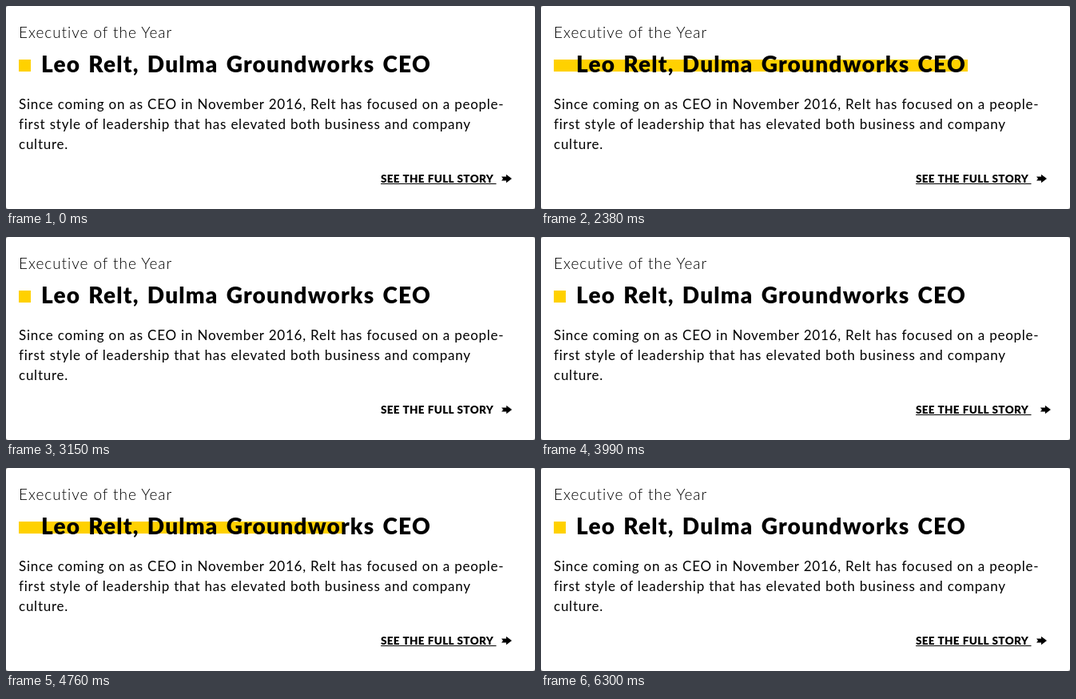
Animation, 662 px wide and 254 px high, one loop 6930 ms. Source, as an HTML page:

```html
<!DOCTYPE html>
<html lang="en">
<head>
<meta charset="utf-8">
<title>Executive of the Year</title>
<style>
  html, body { margin: 0; width: 100%; height: 100%; overflow: hidden; background: #888; }
  svg { display: block; width: 662px; height: 254px; background: #fff; border-radius: 3px; }
  text { font-family: Lato, "Open Sans", sans-serif; fill: #000; }
  .kicker { font-size: 19px; font-weight: 300; letter-spacing: .95px; }
  .title { font-size: 28px; font-weight: 900; letter-spacing: 1.2px; word-spacing: 2.5px; }
  .copy { font-size: 17px; letter-spacing: .76px; word-spacing: .15px; }
  .link { font-size: 13.5px; font-weight: 900; letter-spacing: .32px; word-spacing: .5px; }
  #bar { fill: #ffd100; }
</style>
</head>
<body>
<svg viewBox="0 0 662 254">
  <text class="kicker" x="16" y="40">Executive of the Year</text>
  <rect id="bar" x="16" y="67" width="15" height="15"/>
  <text class="title" x="44" y="83">Leo Relt, Dulma Groundworks CEO</text>
  <text class="copy">
    <tspan x="16" y="129">Since coming on as CEO in November 2016, Relt has focused on a people-</tspan>
    <tspan x="16" y="154">first style of leadership that has elevated both business and company</tspan>
    <tspan x="16" y="179">culture.</tspan>
  </text>
  <text class="link" x="469" y="221">SEE THE FULL STORY</text>
  <rect id="line" x="469" y="222" width="144.5" height="1"/>
  <path id="arrow" d="M620 213.5h6v-2.8l7 5.3-7 5.3v-2.8h-6l2-2.5z"/>
</svg>
<script>
  const LOOP = 6930, TICK = 70;

  // Each step is [start, duration, value]; the value holds until the next step.
  function track(id, prop, rest, steps) {
    const frames = [{ offset: 0, [prop]: rest }];
    let value = rest;
    for (const [start, duration, next] of steps) {
      frames.push({ offset: start / LOOP, [prop]: value, easing: 'ease' });
      frames.push({ offset: (start + duration) / LOOP, [prop]: next });
      value = next;
    }
    frames.push({ offset: 1, [prop]: value });
    const anim = document.getElementById(id).animate(frames, { duration: LOOP, fill: 'both' });
    anim.pause();
    return anim;
  }

  const small = '15px', wide = '518px';
  const home = 'translateX(0px)', nudged = 'translateX(5px)';

  const tracks = [
    track('bar', 'width', small, [
      [1687, 700, wide], [2470, 300, small],
      [4017, 690, wide], [4710, 300, small]
    ]),
    track('line', 'opacity', 1, [
      [3145, 0, 0], [3985, 0, 1], [5455, 0, 0], [6085, 0, 1]
    ]),
    track('arrow', 'transform', home, [
      [3140, 220, nudged], [3980, 220, home],
      [5430, 200, nudged], [6075, 220, home]
    ])
  ];

  const begin = performance.now();
  function draw() {
    const now = (performance.now() - begin) % LOOP;
    const time = Math.floor(now / TICK) * TICK;
    for (const anim of tracks) anim.currentTime = time;
    requestAnimationFrame(draw);
  }
  draw();
</script>
</body>
</html>
```
